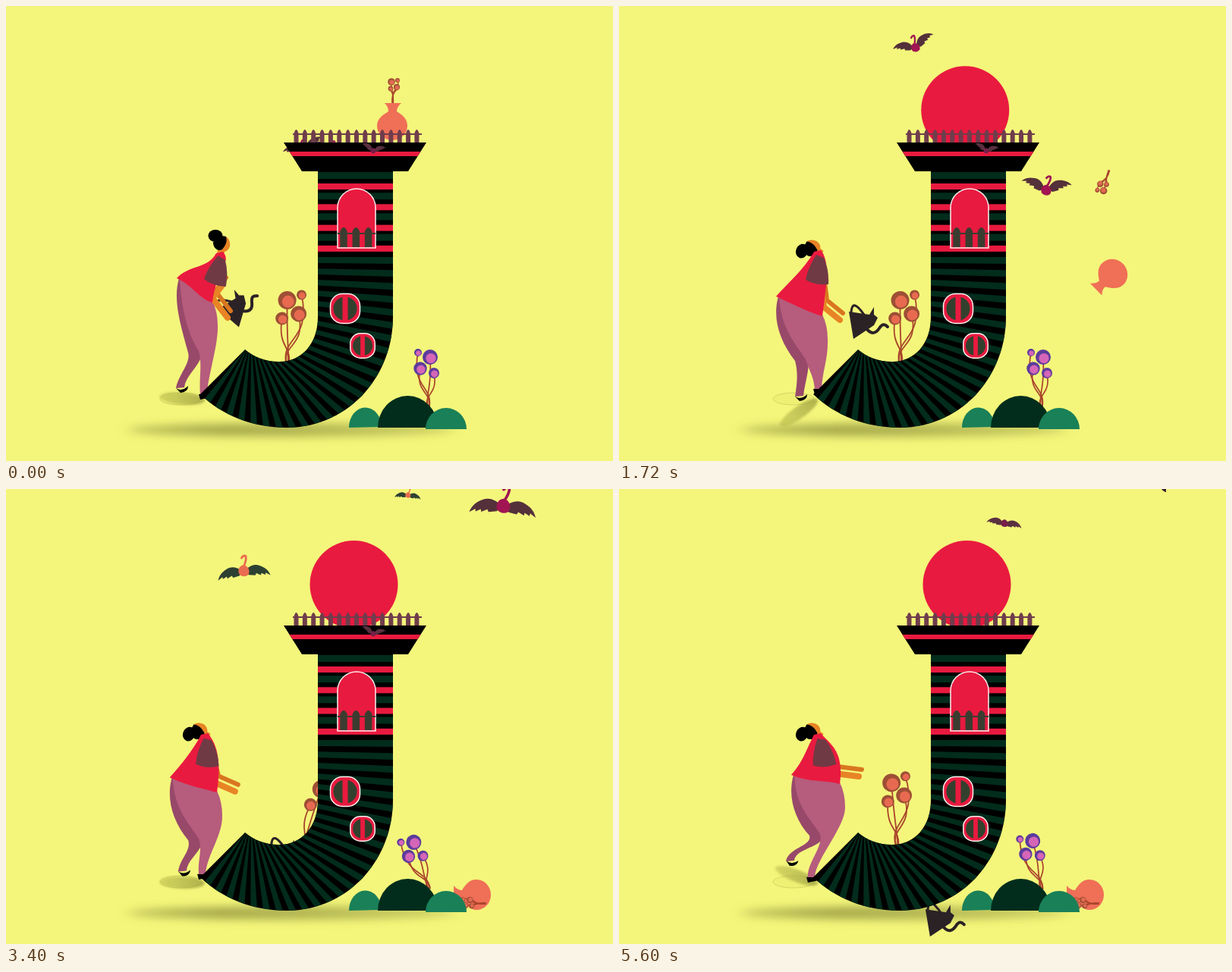
An HTML page for the animation above (5640 ms loop, 800x600 px).

```html
<!DOCTYPE html>
<html lang="en">
<head>
<meta charset="utf-8">
<title>Letter J tower</title>
<style>
html, body { margin: 0; width: 100%; height: 100%; overflow: hidden; background: #f4f67b; }
svg { display: block; width: 100vw; height: 100vh; }
</style>
</head>
<body>
<svg id="stage" viewBox="0 0 800 600">
  <defs>
    <filter id="soft" x="-20%" y="-200%" width="140%" height="500%"><feGaussianBlur stdDeviation="9 6"/></filter>
    <filter id="haze" x="-20%" y="-60%" width="140%" height="220%"><feGaussianBlur stdDeviation="1.5"/></filter>
    <linearGradient id="floor"><stop offset="0" stop-color="#777a2c" stop-opacity=".45"/><stop offset=".3" stop-color="#777a2c" stop-opacity=".62"/><stop offset="1" stop-color="#777a2c" stop-opacity=".35"/></linearGradient>
    <linearGradient id="cast"><stop offset="0" stop-color="#b5b748" stop-opacity=".5"/><stop offset="1" stop-color="#999b3b" stop-opacity=".75"/></linearGradient>
    <clipPath id="letter"><path id="outline" d="M411 217H510V410C510 490 450 556 370 556C325 556 285 540 256 512L315 453C327 463 342 469 360 469C390 469 411 445 411 410Z"/></clipPath>
    <path id="wing" d="M2 2C8-6 15-9 22-7C30-5 35-1 38 5L31 2V5L25 3V6L18 4L17 7L8 7Z"/>
  </defs>
  <rect width="800" height="600" fill="#f4f67b"/>
  <ellipse cx="376" cy="559" rx="216" ry="9" fill="url(#floor)" filter="url(#soft)"/>
  <circle id="sun" r="58" fill="#e91a3f"/>
  <path id="vase" d="M-10-29H12Q6-24 6-18C14-13 20-8 20 1A20 19 0 0 1-20 1C-20-8-13-13-5-18Q-5-24-10-29Z" fill="#ef6f57"/>
  <g id="sprig"></g>
  <g id="birds"></g>
  <g id="violet"></g>
  <path d="M452 556A21.500 26 0 0 1 495 555Z" fill="#1a8058"/>
  <path d="M490 556A39.500 42 0 0 1 569 556Z" fill="#022d1c"/>
  <path d="M553 558A27 28 0 0 1 607 558Z" fill="#1a8058"/>
  <g id="coral"></g>
  <g id="can" fill="#2b2226">
    <path d="M-17-12L10-8L16-18L16-8L21-4L16 6L-11 24Z"/>
    <path d="M-14-11C-13-25-7-22 3-8" fill="none" stroke="#2b2226" stroke-width="3"/>
    <path d="M5 9C13 20 19 16 23 10S30 4 34 8" fill="none" stroke="#2b2226" stroke-width="4" stroke-linecap="round"/>
  </g>
  <g id="woman">
    <ellipse cx="230" cy="518" rx="27" ry="8" fill="#eef074" stroke="#d6d763"/>
    <ellipse id="castShadow" cx="-28" rx="30" ry="8" fill="url(#cast)" filter="url(#haze)"/>
    <path id="rearShoe" d="M-6 0Q2 5 10-3Q10 5 0 6Z"/>
    <path id="frontShoe" d="M-6 0L5-2L10 4L-4 7Z"/>
    <path id="rearLeg" fill="#98496a"/>
    <path id="frontLeg" fill="#b65c7d"/>
    <g fill="none" stroke-linecap="round" stroke-linejoin="round">
      <path id="rearArm" stroke="#d9761f" stroke-width="6" transform="translate(4 -9)"/>
      <path id="frontArm" stroke="#e88425" stroke-width="8"/>
    </g>
    <g id="head">
      <path d="M-5-14L4-21C9-20 11-12 10-8Q8-2 3-1L2 4L-7 4Z" fill="#e88425"/>
      <path d="M5-21C7-14 4-9 0-4C-6-1-12-6-12-13Q-7-24 5-21Z"/>
      <ellipse cx="-9" cy="-22" rx="9.5" ry="8"/>
    </g>
    <path id="shirt" fill="#e91a3f"/>
    <path id="sleeve" d="M-5 5Q-16 22-19 38Q-6 46 11 44Q12 25 5 9Z" fill="#703a45"/>
  </g>
  <use href="#outline"/>
  <g id="stripes" clip-path="url(#letter)"></g>
  <path d="M366 180H554L530 218H390Z"/>
  <path d="M373.500 192H546.500L542.500 198H377.500Z" fill="#e91a3f"/>
  <path d="M437 319V266A25 25 0 0 1 487 266V319Z" fill="#e91a3f" stroke="#fff0ee" stroke-width="1.5"/>
  <g id="fences"></g>
  <g id="portholes"></g>
  <g id="lastBird"></g>
  <path id="straggler" d="M715 0H721V4Q718 4 715 0Z" fill="#3a2230"/>
</svg>
<script>
const LOOP = 5640, STEP = 40;
const SUN_HIT = 1200, KNOCK = 1240, RELEASE = 1720;

const $ = id => document.getElementById(id);
const set = (id, attr, value) => $(id).setAttribute(attr, value);
const place = (id, x, y, turn = 0) => set(id, 'transform', `translate(${x} ${y}) rotate(${turn})`);
const clamp = u => Math.min(1, Math.max(0, u));
const lerp = (a, b, u) => a + (b - a) * u;
const wave = (t, period) => Math.cos(2 * Math.PI * t / period);
const repeat = (n, make) => Array.from({ length: n }, (_, i) => make(i)).join('');

// Blooms are [x, y, radius], with stems that cross near the root.
function plant(id, blooms, rootY, width, outer, inner) {
  const stems = blooms.map(([x, y]) =>
    `<path d="M${-x * .15} ${rootY}C${-x * .5} ${y * .35} ${x * 1.7} ${y * .3} ${x} ${y}"/>`).join('');
  const heads = blooms.map(([x, y, r]) =>
    `<circle cx="${x}" cy="${y}" r="${r}" fill="${outer}"/>` +
    `<circle cx="${x + r * .1}" cy="${y + r * .15}" r="${r * .66}" fill="${inner}"/>`).join('');
  $(id).innerHTML = `<g fill="none" stroke="#a9442b" stroke-width="${width}">${stems}</g>${heads}`;
}
plant('coral', [[-1, -79, 12], [18, -86, 6.5], [-8, -55, 8.5], [14, -61, 10.5]], 3, 1.8, '#9e4f35', '#e76a50');
plant('violet', [[-13, -67, 5], [3, -61, 10], [-10, -46, 8.7], [8, -40, 7]], 4, 1.7, '#5b3c9c', '#d565b7');
plant('sprig', [[-2, -13, 4.8], [6, -15, 3], [-3, -4, 3.4], [5, -6, 4.2]], 15, 1.3, '#a04e35', '#e06b50');

function drawStripes() {
  const edge = d => {
    const path = document.createElementNS('http://www.w3.org/2000/svg', 'path');
    path.setAttribute('d', d);
    const length = path.getTotalLength();
    return u => { const p = path.getPointAtLength(u * length); return `${p.x} ${p.y}`; };
  };
  const inner = edge('M411 331V410C411 445 390 469 360 469C342 469 327 463 315 453');
  const outer = edge('M510 331V410C510 490 450 556 370 556C325 556 285 540 256 512');
  const ahead = u => 1 - (1 - u) ** 1.8;   // the inner edge runs ahead, fanning the stripes
  const count = 25;
  const band = (y, h, color) => `<rect x="411" y="${y}" width="99" height="${h}" fill="${color}"/>`;
  $('stripes').innerHTML =
    repeat(4, i => band(219 + 27.2 * i, 9, '#022c1c') + band(234 + 27.3 * i, 8, '#e91a3f')) +
    repeat(count, i => {
      const a = i / count, b = (i + .52) / count;
      return `<path d="M${inner(ahead(a))}L${outer(a)}L${outer(b)}L${inner(ahead(b))}Z" fill="#022c1c"/>`;
    });
}
drawStripes();

const post = (x, top, bottom, w) =>
  `<path d="M${x - w / 2} ${bottom}V${top + 5}Q${x} ${top - 5} ${x + w / 2} ${top + 5}V${bottom}Z"/>`;
$('fences').innerHTML =
  `<g fill="#6f3d4c"><path d="M378 168H548V170H378Z"/>${repeat(15, i => post(382.5 + i * 11.35, 163, 180, 6))}</g>` +
  `<g fill="#3b3c30"><path d="M437 299H487V301H437Z"/>${repeat(3, i => post(445 + i * 16.3, 292, 318, 9.5))}</g>`;

const porthole = (x, y, r) =>
  `<rect x="${x - r}" y="${y - r}" width="${2 * r}" height="${2 * r}" rx="${r * .82}" fill="#e91a3f" stroke="#fff0ee" stroke-width="1.5"/>` +
  `<circle cx="${x}" cy="${y}" r="${r * .8}" fill="#33402e"/>` +
  `<rect x="${x - r * .18}" y="${y - r * .85}" width="${r * .36}" height="${r * 1.7}" fill="#e91a3f"/>`;
$('portholes').innerHTML = porthole(447, 399, 19.5) + porthole(470, 448, 16.2);

// Waypoints are evenly spaced in time between start and end.
const plum = { body: '#a01552', wing: '#54303a' }, moss = { body: '#e96c50', wing: '#2d4132' };
const flock = [
  { ...plum, start: KNOCK, end: 2080, tilt: -20, size: [.76, .76], route: [[394, 191], [387, -50]] },
  { ...plum, start: KNOCK, end: 3640, tilt: 5, size: [.8, 1.25], route: [[428, 193], [563, 241], [588, 182], [608, 120], [639, 54], [672, -14]] },
  { ...moss, start: 1880, end: 4920, tilt: -6, size: [1, .9], route: [[450, 235], [340, 215], [313, 106], [255, 38], [200, -50]] },
  { ...moss, start: 2200, end: 3560, tilt: 5, size: [.65, .45], route: [[476, 195], [537, -18]] },
  { body: '#76204a', wing: '#5a3040', start: 3720, end: 5600, tilt: 10, size: [.45, .62], lag: 134, neckless: true, route: [[484, 190], [508, 44]] }
];

function birdMarkup({ body, wing, start, end, tilt, size, route, lag = 0, neckless }, t) {
  const u = clamp((t - start) / (end - start));
  const leg = Math.min(Math.floor(u * (route.length - 1)), route.length - 2);
  const [x, y] = route[leg].map((v, k) => lerp(v, route[leg + 1][k], u * (route.length - 1) - leg));
  const flap = u ? 20 * wave(t - 93 - lag, 480) - 5 : -25;
  const neck = neckless ? '' :
    `<path d="M1-4C3-9 6-13 5-18Q2-20-1-16" fill="none" stroke="${body}" stroke-width="3" stroke-linecap="round"/>`;
  return `<g transform="translate(${x} ${y}) rotate(${tilt}) scale(${lerp(...size, u)})">` +
    `<g fill="${wing}"><use href="#wing" transform="rotate(${flap})"/>` +
    `<use href="#wing" transform="rotate(${-flap}) scale(-1 1)"/></g>` +
    `<path d="M0-6C6-5 10 2 6 8Q0 12-6 7C-9 1-6-5 0-6Z" fill="${body}"/>${neck}</g>`;
}

// The woman straightens up first (stoop 1 to 0), then is slowly pushed forward (push 0 to 1).
function drawWoman(t) {
  const stoop = 1 - Math.sin(clamp(t / RELEASE) * Math.PI / 2);
  const push = Math.max(0, (t - RELEASE) / 3880);
  const joint = (x, y, px, py, sx, sy) => {
    const cx = x + px * push + sx * stoop, cy = y + py * push + sy * stoop;
    return (dx = 0, dy = 0) => `${(cx + dx).toFixed(1)} ${(cy + dy).toFixed(1)} `;
  };
  const neck = joint(265, 323, 0, 0, 20, 2);
  const back = joint(207, 383, 20, -6, 18, -24);
  const hem = joint(268, 409, 23, -20, 4, -18);
  const knee = joint(246, 466, 19, -11, 8, -11);
  const heel = joint(238, 515, -12, -24, -8, -11);
  const toe = joint(262, 505, -9, 7, -2, 7);
  const elbow = joint(270, 397, 14, -22, 2, -12);
  const hand = joint(291, 414, 25, -35, 1, -3);

  set('frontLeg', 'd', `M${back(4, 0)}C${back(6, 42)}${knee(-14, -22)}${knee()}C${knee(5, 16)}${toe(-6, -18)}${toe(-4)}L${toe(5)}` +
    `C${toe(6, -24)}${hem(8, 56)}${hem(7, 30)}Q${hem(7, 12)}${hem(0, -2)}Z`);
  set('rearLeg', 'd', `M${back(3, 0)}C${back(-5, 28)}${back(4, 58)}${knee(-14, 2)}C${knee(-10, 16)}${heel(-3, -18)}${heel(-6)}L${heel(5, -1)}` +
    `C${heel(7, -18)}${knee(4, 18)}${knee(4, 2)}L${hem(-8, 4)}Z`);
  set('shirt', 'd', `M${neck(-8, 1)}L${neck(1, -1)}C${neck(13, 14)}${hem(6, -45)}${hem()}C${hem(-18, -5)}${back(22, 10)}${back()}C${back(16, -18)}${neck(-19, 22)}${neck(-8, 1)}Z`);
  const arm = `M${neck(1 + 8 * push, 42 - 8 * push)}L${elbow()}L${hand()}`;
  set('frontArm', 'd', arm);
  set('rearArm', 'd', arm);

  const at = (id, point, turn = 0) => place(id, ...point().trim().split(' '), turn);
  at('sleeve', neck, 8 * stoop - 14 * push);
  at('head', neck, -68 * clamp((t - 1040) / 640));
  at('rearShoe', heel, 12 * push);
  at('frontShoe', toe);
  place('castShadow', 260, 520, 40 * stoop - 35 + 56 * Math.sqrt(push));
}

function drawSun(t) {
  const since = t - SUN_HIT;
  const offset = .36 * since * Math.exp(-Math.max(since, 0) / 185);
  set('sun', 'cx', 458.5 - .2 * Math.max(0, offset));
  set('sun', 'cy', 126 + offset);
  set('sun', 'visibility', t < 660 ? 'hidden' : 'visible');
}

function drawVase(t) {
  const since = Math.max(0, t - KNOCK);
  const fall = Math.min(since, 665);
  place('vase', 509 + .627 * fall - .000694 * fall ** 2, 157 + .000855 * fall ** 2, Math.min(270, .47 * fall));
  const drop = Math.min(since, 1770);
  place('sprig', 510 + (143 - .02 * drop) * (1 - Math.exp(-drop / 120)), 113 + .245 * drop, 270 * (1 - Math.exp(-drop / 360)));
}

function drawPlants(t) {
  const lean = 7 + 12 * wave(Math.max(t, 1840) - 3400, 4430);
  place('coral', 372 + lean, 467 + .2 * lean, lean);
  place('violet', 556, 524, -9.5 - 12.5 * wave(Math.max(t, 2494) - 3250, 1950));
}

function drawCan(t) {
  const pour = clamp(t / RELEASE), sink = Math.max(0, t - RELEASE);
  place('can', 300 + 20 * pour + .026 * sink, 398 + 17 * pour ** 2 + .039 * sink, -40 * (1 - pour));
}

function draw(t) {
  drawSun(t);
  drawVase(t);
  drawPlants(t);
  drawCan(t);
  drawWoman(t);
  $('birds').innerHTML = flock.slice(0, -1).map(bird => birdMarkup(bird, t)).join('');
  $('lastBird').innerHTML = birdMarkup(flock[flock.length - 1], t);
  set('straggler', 'visibility', t >= 3600 ? 'visible' : 'hidden');
}

const start = performance.now();
function tick() {
  const t = (performance.now() - start) % LOOP;
  draw(Math.floor(t / STEP) * STEP);
  requestAnimationFrame(tick);
}
tick();
</script>
</body>
</html>
```
